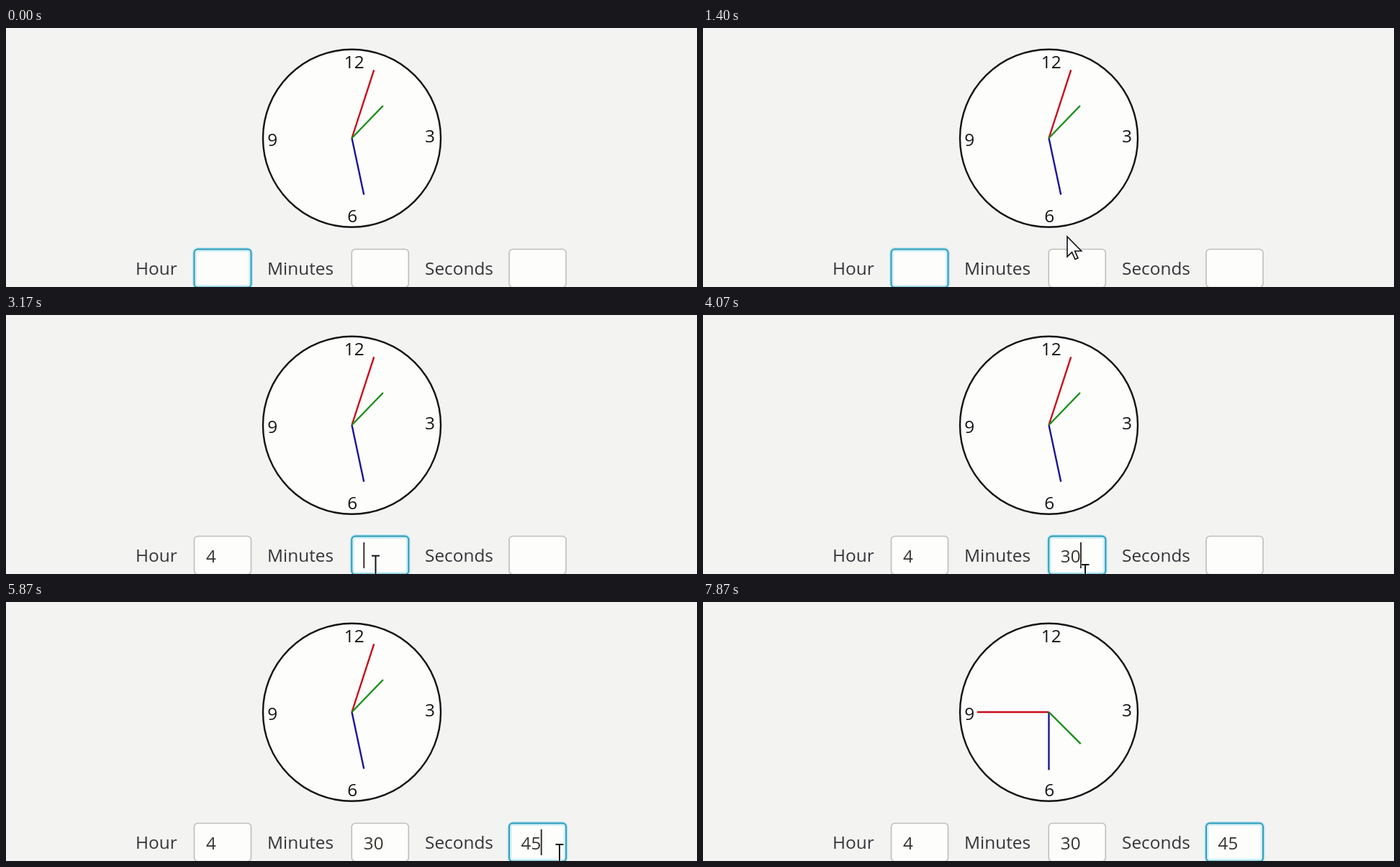
Recreate the animation shown at these times as an HTML page with a canvas. Size 960 by 360 pixels, loop 7.9 s.

```html
<!DOCTYPE html>
<html lang="en">
<head>
<meta charset="utf-8">
<title>Clock</title>
<style>
html, body { margin: 0; width: 100%; height: 100%; overflow: hidden; background: #f3f3f1; }
canvas { display: block; width: 960px; height: 360px; }
</style>
</head>
<body>
<canvas id="stage" width="960" height="360"></canvas>
<script>
const ctx = document.getElementById('stage').getContext('2d');
const LOOP = 7900;
const SET_AT = 7300;
const BLINK = 500;
const KEY_GAP = 250;
const CX = 480.5, CY = 153;
const FONT = '"Open Sans", "Noto Sans", sans-serif';
const BG = '#f3f3f1', PAPER = '#fdfdfc', INK = '#141416';

// focus: when the field is clicked, type: when its first key is pressed
const fields = [
  { label: 'Hour', labelX: 180, value: '4', focus: 0, type: 2200 },
  { label: 'Minutes', labelX: 363, value: '30', focus: 3000, type: 3600 },
  { label: 'Seconds', labelX: 582, value: '45', focus: 4750, type: 5200 }
];
const FIELD = { y: 307.5, w: 79, h: 53 };
fields.forEach((f, i) => f.x = 261.5 + 218.8 * i);

// Pointer stops; it eases from one to the next
const stops = [
  { t: 300, x: 640, y: 400 },
  { t: 820, x: 815, y: 120 },
  { t: 1400, x: 506, y: 290 },
  { t: 1900, x: 443, y: 300 },
  { t: 2600, x: 443, y: 300 },
  { t: 3400, x: 531, y: 362 },
  { t: 4300, x: 531, y: 362 },
  { t: 5050, x: 769, y: 352 },
  { t: 6350, x: 769, y: 352 },
  { t: 6900, x: 804, y: 400 }
];

function pointer(t) {
  const next = stops.findIndex(s => s.t > t);
  if (next < 0) return stops[stops.length - 1];
  if (next === 0) return stops[0];
  const a = stops[next - 1], b = stops[next];
  const k = (t - a.t) / (b.t - a.t);
  const e = k * k * (3 - 2 * k);
  return { x: a.x + (b.x - a.x) * e, y: a.y + (b.y - a.y) * e };
}

function text(s, x, y, size, color) {
  ctx.font = size + 'px ' + FONT;
  ctx.fillStyle = color;
  ctx.fillText(s, x, y);
}

function line(x1, y1, x2, y2, color, width) {
  ctx.beginPath();
  ctx.moveTo(x1, y1);
  ctx.lineTo(x2, y2);
  ctx.strokeStyle = color;
  ctx.lineWidth = width;
  ctx.stroke();
}

function paint(fill, color, width) {
  ctx.fillStyle = fill;
  ctx.fill();
  ctx.strokeStyle = color;
  ctx.lineWidth = width;
  ctx.stroke();
}

function hand(turn, len, color) {
  const a = turn * Math.PI * 2;
  line(CX, CY, CX + Math.sin(a) * len, CY - Math.cos(a) * len, color, 2.4);
}

function clock(t) {
  ctx.beginPath();
  ctx.arc(CX, CY + 0.2, 123.5, 0, Math.PI * 2);
  paint(PAPER, INK, 2.4);

  text('12', 469.7, 55.7, 24.4, INK);
  text('3', 582, 159, 24.4, INK);
  text('6', 474.3, 269.5, 24.4, INK);
  text('9', 363.3, 164, 24.4, INK);

  const [h, m, s] = t < SET_AT ? [1, 28, 3] : [4, 30, 45];
  hand(s / 60, 99.5, '#c80c18');
  hand(m / 60, 80.5, '#1c1498');
  hand((h + m / 60) / 12, 62.5, '#189018');
}

function box(x, grow) {
  ctx.beginPath();
  ctx.roundRect(x - grow, FIELD.y - grow, FIELD.w + 2 * grow, FIELD.h + 2 * grow, 5 + grow);
}

function field(f, focused, t) {
  text(f.label, f.labelX, 342.7, 24.4, '#34343a');
  if (focused) {
    box(f.x, 1);
    paint(PAPER, '#bce4f0', 3);
    box(f.x, -2);
    paint(PAPER, '#d0f0f6', 3);
    box(f.x, 0);
    ctx.strokeStyle = '#2c9cb8';
    ctx.lineWidth = 2;
    ctx.stroke();
  } else {
    box(f.x, 0);
    paint(PAPER, '#bebebc', 1.6);
  }

  const keys = Math.floor((t - f.type) / KEY_GAP) + 1;
  const shown = f.value.slice(0, Math.max(0, keys));
  text(shown, f.x + 16.5, 344, 24.2, '#38342e');
  if (focused) caret(f, shown, t);
}

// Every click or key press restarts the blink
function caret(f, shown, t) {
  let since = f.focus || -BLINK;
  if (shown) since = f.type + (shown.length - 1) * KEY_GAP;
  if (t >= SET_AT) since = SET_AT;
  if (Math.floor((t - since) / BLINK) % 2) return;
  const x = f.x + 17 + ctx.measureText(shown).width;
  line(x, 316, x, 352, '#38342e', 2);
}

function drawArrow(x, y) {
  ctx.save();
  ctx.translate(x, y);
  ctx.scale(1.64, 1.64);
  ctx.fillStyle = '#fff';
  ctx.strokeStyle = INK;
  const shape = new Path2D('M0 0V17L4 13.2L6.7 19.2L9.1 18.2L6.5 12.2H12Z');
  ctx.fill(shape);
  ctx.lineWidth = 1;
  ctx.stroke(shape);
  ctx.restore();
}

function drawBeam(x, y) {
  for (const [color, w] of [['#fff', 4], [INK, 2]]) {
    line(x, y - 15, x, y + 15, color, w);
    for (const end of [-15, 15]) line(x - 5.5, y + end, x + 5.5, y + end, color, w);
  }
}

function draw(t) {
  ctx.fillStyle = BG;
  ctx.fillRect(0, 0, 960, 360);
  clock(t);
  const active = fields.filter(f => t >= f.focus).pop();
  fields.forEach(f => field(f, f === active, t));

  const { x, y } = pointer(t);
  const over = y > FIELD.y && y < 366 &&
    fields.some(f => x > f.x && x < f.x + FIELD.w);
  (over ? drawBeam : drawArrow)(x, y);
}

const start = performance.now();
function tick(now) {
  draw(Math.max(0, now - start) % LOOP);
  requestAnimationFrame(tick);
}
draw(0);
requestAnimationFrame(tick);
</script>
</body>
</html>
```
